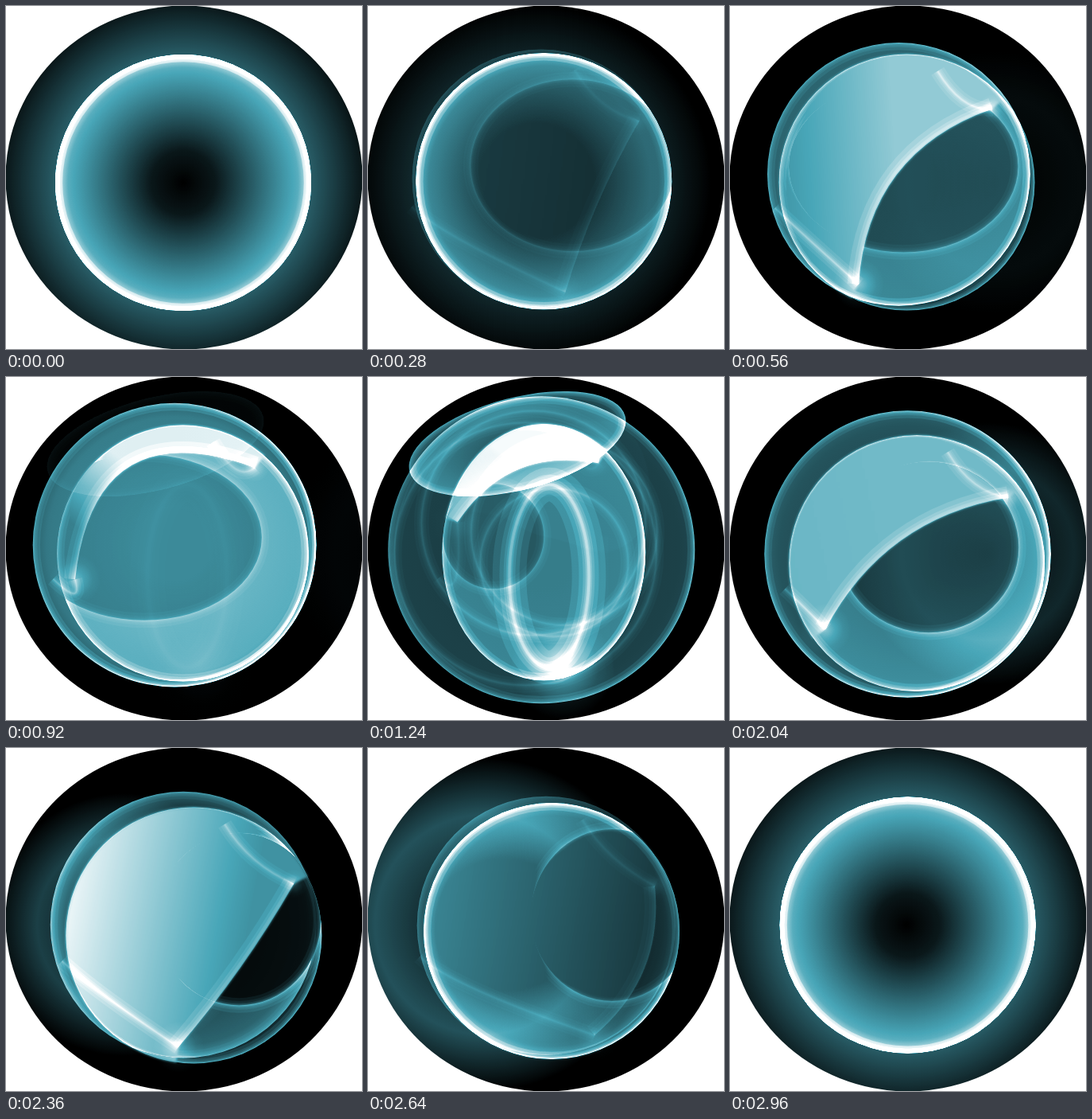
An HTML page with a canvas for the animation above (3 s loop, 448 by 431 pixels).

```html
<!DOCTYPE html>
<html lang="en">
<head>
<meta charset="utf-8">
<title>Folding light</title>
<style>
  html, body { margin: 0; width: 100%; height: 100%; overflow: hidden; background: #fff; }
  canvas { display: block; clip-path: ellipse(224.5px 216px at 224px 215.5px); }
</style>
</head>
<body>
<canvas width="448" height="431"></canvas>
<script>
const W = 448, H = 431, LOOP = 3000, TAU = 2 * Math.PI;
const ctx = document.querySelector('canvas').getContext('2d', { willReadFrequently: true });

const clamp = v => Math.min(1, Math.max(0, v));
const lerp = (a, b, u) => a + (b - a) * u;
const bump = (t, at, width) => Math.exp(-(((t - at) / width) ** 2));
const gray = v => {
  const n = Math.round(255 * clamp(v));
  return `rgb(${n},${n},${n})`;
};

// Light adds up in gray; the palette turns it into black, teal and white
const palette = Array.from({ length: 256 }, (_, i) => {
  const v = i / 255, low = Math.min(1, v / .6), high = Math.max(0, (v - .6) / .4);
  return [72, 166, 184].map(c => c * low + (255 - c) * high);
});

function tint() {
  const image = ctx.getImageData(0, 0, W, H), d = image.data;
  for (let i = 0; i < d.length; i += 4) {
    const c = palette[d[i]];
    for (let k = 0; k < 3; k++) d[i + k] = c[k];
  }
  ctx.putImageData(image, 0, 0);
}

function oval({ x, y, rx, ry, turn = 0 }) {
  const path = new Path2D();
  path.ellipse(x, y, rx, ry, turn, 0, TAU);
  return path;
}

function arc(from, control, to) {
  const path = new Path2D();
  path.moveTo(...from);
  path.quadraticCurveTo(...control, ...to);
  return path;
}

const onOval = (o, angle, r = 1) =>
  [o.x + o.rx * r * Math.cos(angle), o.y + o.ry * r * Math.sin(angle)];

// A bright core that falls off smoothly to both sides
function glow(path, style, size = 1.3) {
  ctx.globalCompositeOperation = 'lighter';
  for (let k = 0; k < 6; k++) {
    ctx.lineWidth = size * 1.7 ** k;
    ctx.strokeStyle = style;
    ctx.stroke(path);
  }
}
const line = (path, v, size) => glow(path, gray(v / 6), size);

function inside(path, paint) {
  ctx.save();
  ctx.clip(path);
  paint();
  ctx.restore();
}

function radial(x, y, r, v, stops) {
  const g = ctx.createRadialGradient(x, y, 0, x, y, r);
  for (const [at, part] of stops) g.addColorStop(at, gray(v * part));
  ctx.globalCompositeOperation = 'lighter';
  ctx.fillStyle = g;
  ctx.fillRect(0, 0, W, H);
}
const spot = ([x, y], r, v) => radial(x, y, r, v, [[0, 1], [.35, .5], [.7, .12], [1, 0]]);

// A shell: brighter toward its edge, with a rim that varies along one direction
function shell(o, mid, edge, rimFrom, rimTo, angle) {
  const path = oval(o);
  ctx.save();
  ctx.translate(o.x, o.y);
  ctx.rotate(o.turn || 0);
  ctx.scale(o.rx, o.ry);
  const g = ctx.createRadialGradient(0, 0, 0, 0, 0, 1);
  for (const [at, part] of [[0, 0], [.25, 0], [.6, .3], [.9, .55], [1, 1]])
    g.addColorStop(at, gray(lerp(mid, edge, part)));
  ctx.globalCompositeOperation = 'lighter';
  ctx.fillStyle = g;
  ctx.fill(oval({ x: 0, y: 0, rx: 1, ry: 1 }));
  ctx.restore();

  const rim = ctx.createLinearGradient(...onOval(o, angle + Math.PI), ...onOval(o, angle));
  rim.addColorStop(0, gray(rimFrom / 6));
  rim.addColorStop(1, gray(rimTo / 6));
  inside(path, () => glow(path, rim));
}

function lens(o, alpha, frame) {
  const path = oval(o);
  inside(oval(frame), () => {
    ctx.globalCompositeOperation = 'source-over';
    ctx.fillStyle = `rgba(0,0,0,${alpha})`;
    ctx.fill(path);
    line(path, alpha * .4);
  });
}

// The part of an oval on the upper left of a bent chord
function sheet(o, a1, a2, bulge, left, right, alpha, calm) {
  const tip1 = onOval(o, a1, .88), tip2 = onOval(o, a2, .88);
  const dx = tip2[0] - tip1[0], dy = tip2[1] - tip1[1], d = Math.hypot(dx, dy);
  const middle = k => [(tip1[0] + tip2[0]) / 2 - dy / d * k, (tip1[1] + tip2[1]) / 2 + dx / d * k];
  const control = middle(2 * bulge);

  const path = new Path2D();
  path.ellipse(o.x, o.y, o.rx, o.ry, 0, a2, a1 + TAU);
  path.lineTo(...tip1);
  path.quadraticCurveTo(...control, ...tip2);
  path.closePath();

  const g = ctx.createLinearGradient(o.x - o.rx, o.y, ...middle(bulge));
  g.addColorStop(0, gray(left * alpha));
  g.addColorStop(1, gray(right * alpha));
  ctx.globalCompositeOperation = 'lighten';
  ctx.filter = 'blur(1.5px)';
  ctx.fillStyle = g;
  ctx.fill(path);
  ctx.filter = 'none';
  inside(path, () => line(arc(tip1, control, tip2), .25 * alpha, 2));

  // Creases run from the tips to the rim
  line(arc(onOval(o, -1.3, .9), onOval(o, -.9, .7), tip1), .16 * calm);
  line(arc(onOval(o, 2.95, 1.05), onOval(o, 2.65, .9), tip2), .22 * calm);
  spot(tip1, 18, .2 * calm);
  spot(tip2, 32, .25 * calm);
}

// Smooth closed curve through the middles of its corner points
function blob(points) {
  const path = new Path2D(), n = points.length;
  const half = i => [0, 1].map(k => (points[i % n][k] + points[(i + 1) % n][k]) / 2);
  path.moveTo(...half(0));
  for (let i = 1; i <= n; i++) path.quadraticCurveTo(...points[i % n], ...half(i));
  return path;
}

const cloud = blob([[88, 166], [125, 154], [215, 112], [236, 55], [320, 52], [354, 105],
  [358, 185], [305, 228], [245, 205], [205, 198], [165, 172]]);
const spike = arc([292, 200], [298, 375], [222, 386]);
spike.lineTo(313, 389);
spike.quadraticCurveTo(301, 330, 303, 200);

function flare(v) {
  ctx.globalCompositeOperation = 'lighter';
  for (const [blur, part] of [[26, .5], [9, .25], [1, 1]]) {
    ctx.filter = `blur(${blur}px)`;
    ctx.fillStyle = gray(v * part);
    ctx.fill(cloud);
    ctx.fill(spike);
  }
  ctx.filter = 'none';
}

function draw(now) {
  const t = now % LOOP, phase = TAU * t / LOOP;
  const c = Math.cos(phase), s = Math.sin(phase), swing = (1 - c) / 2;
  const wave = (base, a, b) => base + a * c + b * s;
  const fold = Math.min(1, swing / .3);     // how far the ring has opened
  const storm = bump(t, 1420, 300);         // the busy middle of the loop
  const ring = bump(t, 1240, 200);
  const calm = fold * (1 - storm);

  const drift = -6 * s * (1 + s), lean = 7 * s * (s - 1), size = 162 + 36 * swing ** 2;
  const outer = { x: 223 + drift, y: 222 + drift, rx: size, ry: size };
  const inner = { x: 223 + lean, y: 222 + lean, rx: 161 - 33 * ring, ry: 161 };
  const hole = {
    x: inner.x + wave(7, 60, -37), y: inner.y - 20,
    rx: wave(129, -16, 23) - 130 * storm, ry: 108 - 60 * storm
  };

  ctx.globalCompositeOperation = 'source-over';
  ctx.fillStyle = '#000';
  ctx.fillRect(0, 0, W, H);

  const haze = (.33 - .3 * Math.max(0, s)) * (.6 + .4 * c) * (1 - storm);
  radial(223 + fold * wave(99, -257, 118), 222, 245 - 80 * fold, haze, [[0, 0], [.66, 1], [1, 0]]);

  const shade = clamp(wave(.3, -.27, .19) - .6 * storm);
  shell(outer, shade * fold, (.36 - .15 * storm) * fold,
    .25 * fold, clamp(wave(.7, -1.1, .31) - 1.9 * storm) * fold, .5);
  shell(inner, .26 * swing, lerp(.62, .12 + .15 * swing, fold),
    lerp(.8, .35, fold), lerp(.8, .5 + .3 * storm, fold), .4);
  lens(hole, fold * Math.max(.3, wave(.475, .5, -.27)), inner);
  sheet(inner, wave(-.66, .21, -.14), wave(2.24, -1.21, .26), wave(39, -60, 32) * (1 - storm),
    wave(.615, .41, -.25) + .6 * storm, wave(.72, -.23, .14) - .15 * storm, fold, calm);

  // Thin loops that turn through the storm
  for (let k = 0; k < 4; k++) {
    const r = 165 - 24 * k;
    const [x, y] = onOval({ x: 222, y: 208, rx: 28, ry: 28 }, 1.6 * k + phase);
    line(oval({ x, y, rx: r, ry: r }), .17 * storm);
  }

  shell({ x: 188, y: 84, rx: 140, ry: 58, turn: -.25 }, .1 * ring, .4 * ring, .2 * ring, .3 * ring, 0);
  line(oval({ x: 228, y: 250, rx: 50, ry: 115 }), .4 * ring, 3);
  spot([245, 365], 65, .45 * ring);
  flare(bump(t, 1600, 160));
  tint();
}

const start = performance.now();
function loop() {
  draw(performance.now() - start);
  requestAnimationFrame(loop);
}
loop();
</script>
</body>
</html>
```
